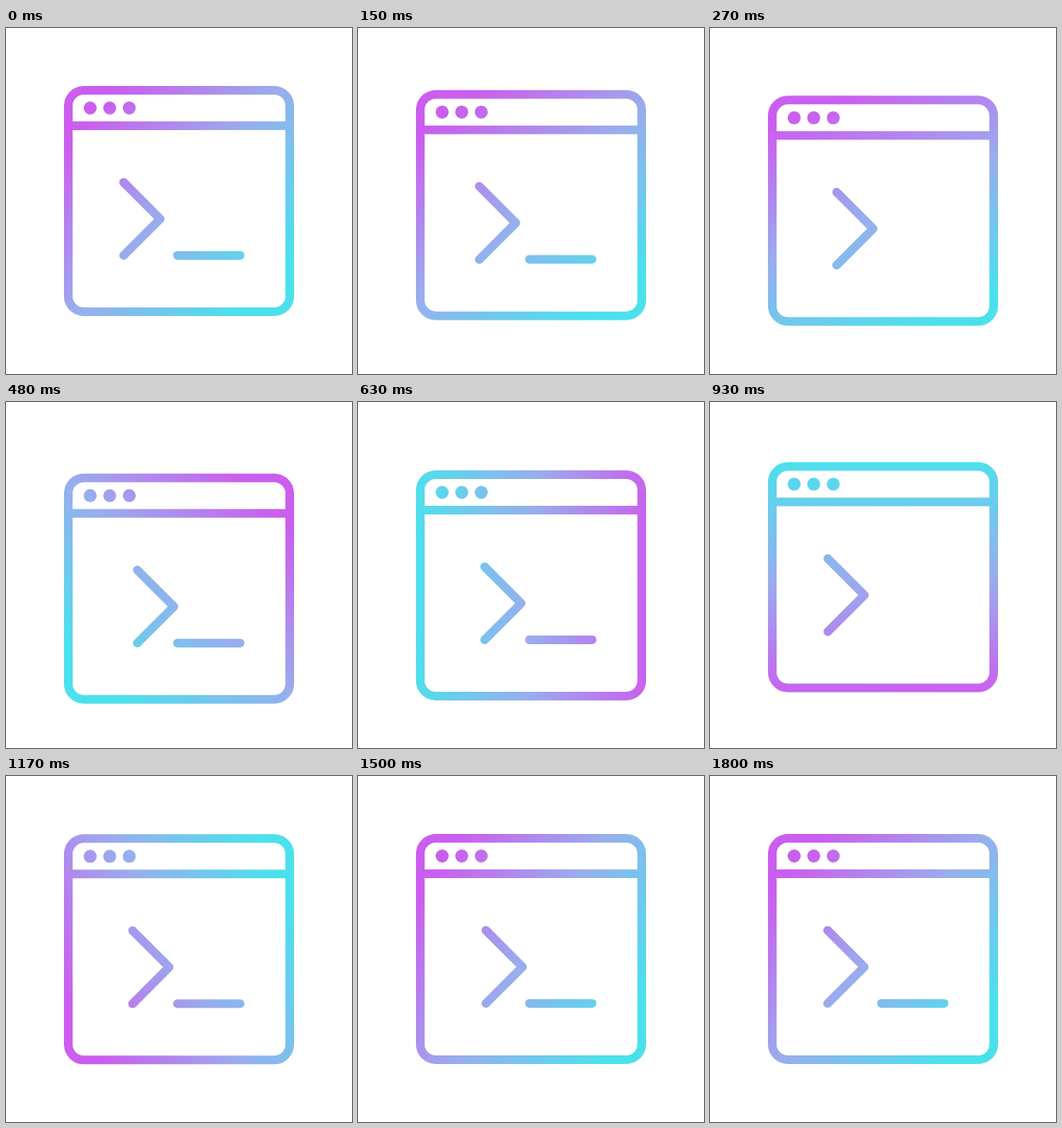
These frames come from a looping animation (400 by 400 pixels, 3.83 s). An HTML page with a canvas:

```html
<!DOCTYPE html>
<html lang="en">
<head>
<meta charset="utf-8">
<title>Terminal window</title>
<style>
  html, body { margin: 0; width: 100%; height: 100%; overflow: hidden; background: #fff; }
  canvas { display: block; width: 100vmin; height: 100vmin; margin: auto; }
</style>
</head>
<body>
<canvas id="stage"></canvas>
<script>
const SIZE = 400, LOOP = 3830, STEP = 30, MOVE_END = 1800;
const canvas = document.getElementById('stage');
const ctx = canvas.getContext('2d');

const clamp = x => Math.min(1, Math.max(0, x));
const smooth = x => x * x * (3 - 2 * x);

// Cubic easing with control points (x1, 0) and (x2, 1).
function ease(x, x1, x2) {
  let lo = 0, hi = 1;
  for (let i = 0; i < 24; i++) {
    const s = (lo + hi) / 2, r = 1 - s;
    if (3 * r * r * s * x1 + 3 * r * s * s * x2 + s * s * s < x) lo = s;
    else hi = s;
  }
  return smooth(lo);
}

// Window drops quickly, then settles back.
const DROP = 16, DROP_PEAK = 420, DROP_END = 1350;
function dropAt(t) {
  if (t < DROP_PEAK) return DROP * smooth(t / DROP_PEAK);
  return DROP * (1 - ease(clamp((t - DROP_PEAK) / (DROP_END - DROP_PEAK)), 1 / 3, 0.2));
}

// Prompt nudges right and back, twice.
const NUDGE = 16, HALF = 450;
function nudgeAt(t) {
  const x = (t % (2 * HALF)) / HALF;
  return NUDGE * smooth(x < 1 ? x : 2 - x);
}

// Gradient direction: [time, degrees], one full turn.
const TURN = [[0, 42], [270, 65], [480, 134], [750, 218], [1170, 330], [1500, 393], [1620, 402]];
function slopeAt(i) {
  if (i === 0 || i === TURN.length - 1) return 0;
  const [a, b, c] = [TURN[i - 1], TURN[i], TURN[i + 1]];
  const before = (b[1] - a[1]) / (b[0] - a[0]);
  const after = (c[1] - b[1]) / (c[0] - b[0]);
  return 2 * before * after / (before + after);
}
function angleAt(t) {
  const end = TURN.findIndex(k => k[0] > t);
  if (end < 0) return TURN[0][1];
  const i = end - 1, [t0, a0] = TURN[i], [t1, a1] = TURN[end];
  const span = t1 - t0, u = (t - t0) / span, v = 1 - u;
  return a0 + (a1 - a0) * smooth(u)
    + span * u * v * (v * slopeAt(i) - u * slopeAt(end));
}

const cursorOn = t => !(t >= 180 && t < 360 || t >= 900 && t < 1080);

function gradient(degrees) {
  const a = degrees * Math.PI / 180, reach = 140, mid = SIZE / 2;
  const dx = reach * Math.cos(a), dy = reach * Math.sin(a);
  const g = ctx.createLinearGradient(mid - dx, mid - dy, mid + dx, mid + dy);
  g.addColorStop(0, '#cb5eee');
  g.addColorStop(0.5, '#98aeed');
  g.addColorStop(1, '#4be1ec');
  return g;
}

function line(...points) {
  ctx.beginPath();
  points.forEach(([x, y]) => ctx.lineTo(x, y));
  ctx.stroke();
}

function draw(t) {
  const scale = canvas.width / SIZE;
  ctx.setTransform(scale, 0, 0, scale, 0, 0);
  ctx.fillStyle = '#fff';
  ctx.fillRect(0, 0, SIZE, SIZE);

  ctx.translate(0, dropAt(t));
  ctx.fillStyle = ctx.strokeStyle = gradient(angleAt(t));
  ctx.lineWidth = 10;
  ctx.lineJoin = 'round';

  ctx.beginPath();
  ctx.roundRect(72, 72, 256, 256, 18);
  ctx.stroke();
  ctx.lineCap = 'butt';
  line([72, 113], [328, 113]);

  for (const x of [97.3, 119.9, 142.5]) {
    ctx.beginPath();
    ctx.arc(x, 92.5, 7.5, 0, 2 * Math.PI);
    ctx.fill();
  }

  ctx.lineCap = 'round';
  const n = nudgeAt(t);
  line([136 + n, 178.4], [178.3 + n, 220.7], [136 + n, 263]);
  if (cursorOn(t)) line([198.2, 262.9], [270.6, 262.9]);
}

function fit() {
  const px = Math.round(Math.min(innerWidth, innerHeight) * (devicePixelRatio || 1));
  if (px && canvas.width !== px) canvas.width = canvas.height = px;
}

const start = performance.now();
function tick() {
  fit();
  const t = (performance.now() - start) % LOOP;
  draw(Math.min(MOVE_END, Math.floor(t / STEP) * STEP));
  requestAnimationFrame(tick);
}
tick();
</script>
</body>
</html>
```
